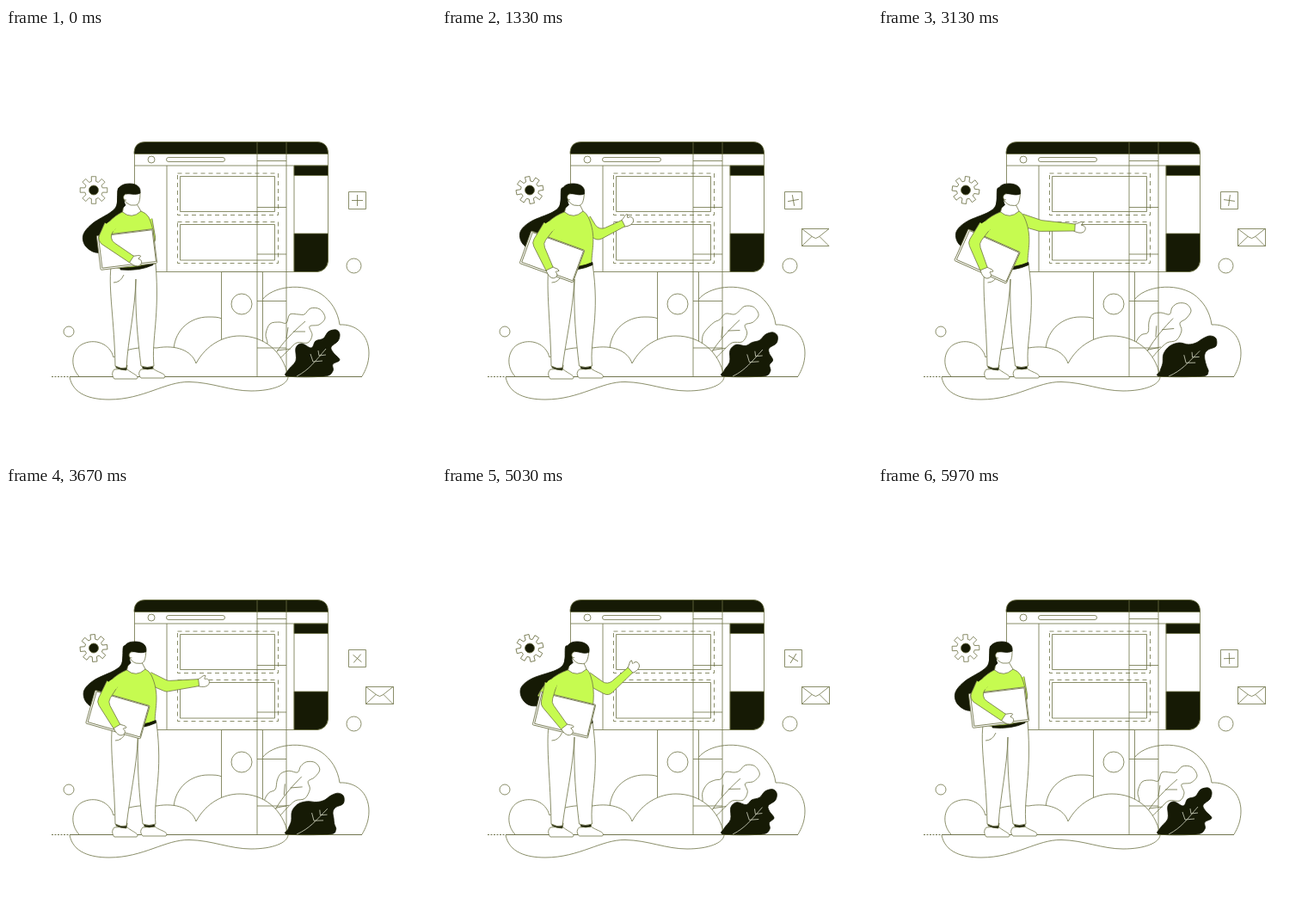
An HTML page with a canvas for the animation above (6000 ms loop, 500 px wide and 500 px high).

```html
<!DOCTYPE html>
<html>
<head>
<meta charset="utf-8">
<style>
html, body { margin: 0; width: 100%; height: 100%; overflow: hidden; background: #fff; }
canvas { display: block; }
</style>
</head>
<body>
<canvas id="stage" width="500" height="500"></canvas>
<script>
const ctx = document.getElementById('stage').getContext('2d');
const LOOP = 6000, TAU = Math.PI * 2;
const DARK = '#161a05', GREEN = '#c6fb50', LINE = '#6d7145', WHITE = '#fff';

// time, lean, hip, laptop x y angle, near elbow, near wrist, far elbow, far wrist, far hand angle
const poses = [
  [0, 0, 0, 140.5, 257.5, -7, 112, 246, 146, 269, 168, 246, 156, 262, 20],
  [1330, 7, 5, 128, 266, 20, 111, 250, 125, 280, 181, 242, 211, 227, -22],
  [2270, 2, 3, 130, 266, 11.5, 111, 253, 130, 281, 184, 234, 222, 226, -4],
  [3130, 7, 5, 127, 265.5, 24, 111, 250, 123, 280, 189, 230, 229, 232, 12],
  [4230, 3, 3, 133, 266, 7.5, 113, 252, 135, 279, 185, 236, 219, 225, -15],
  [5030, 11, 5, 142, 266, 13.5, 121, 253, 142, 280, 193, 238, 219, 214, -38]
];
poses.push([LOOP, ...poses[0].slice(1)]);

const darkLeaf = [
  [328,405, 328,398, 337,387, 337,372, 344,367, 355,372, 360,364, 369,361, 375,353,
   384,351, 388,356, 386,364, 378,371, 381,378, 388,386, 380,391, 380,399, 370,405],
  [328,405, 328,399, 331,390, 332,379, 339,370, 350,366, 361,368, 370,366, 378,361,
   386,358, 393,361, 393,370, 384,374, 380,379, 380,386, 382,393, 384,400, 376,405]
];
const lightLeaf = [
  [302,375, 304,366, 302,356, 307,344, 318,342, 326,343, 330,333, 340,333, 347,333, 354,326,
   365,327, 371,337, 364,345, 353,347, 356,357, 351,366, 338,366, 328,375, 315,385],
  [302,377, 300,366, 306,357, 314,354, 315,342, 319,333, 329,331, 339,333, 342,325, 349,320,
   359,321, 364,329, 358,338, 351,343, 353,352, 347,363, 336,366, 326,375, 315,385]
];

const mix = (a, b, k) => a.map((v, i) => v + (b[i] - v) * k);

function paint(path, fill, stroke = LINE, width = 0.8) {
  if (fill) { ctx.fillStyle = fill; ctx.fill(path); }
  if (stroke) { ctx.strokeStyle = stroke; ctx.lineWidth = width; ctx.stroke(path); }
}
const shape = (d, fill, stroke, width) => paint(new Path2D(d), fill, stroke, width);

function rect(x, y, w, h, fill, r = 0) {
  const p = new Path2D();
  p.roundRect(x, y, w, h, r);
  paint(p, fill);
}

function circle(x, y, r, fill) {
  const p = new Path2D();
  p.arc(x, y, r, 0, TAU);
  paint(p, fill);
}

function at(x, y, degrees, draw) {
  ctx.save();
  ctx.translate(x, y);
  ctx.rotate(degrees * Math.PI / 180);
  draw();
  ctx.restore();
}

// Closed smooth curve through a flat list of points
function blob(list) {
  const n = list.length / 2, p = new Path2D();
  const X = i => list[(i + n) % n * 2], Y = i => list[(i + n) % n * 2 + 1];
  p.moveTo(X(0), Y(0));
  for (let i = 0; i < n; i++) {
    p.bezierCurveTo(X(i) + (X(i + 1) - X(i - 1)) / 6, Y(i) + (Y(i + 1) - Y(i - 1)) / 6,
      X(i + 1) - (X(i + 2) - X(i)) / 6, Y(i + 1) - (Y(i + 2) - Y(i)) / 6, X(i + 1), Y(i + 1));
  }
  p.closePath();
  return p;
}

// Tapered sleeve: shoulder, elbow and wrist with half widths
function sleeve(s, e, w, ws, we, ww) {
  const a = Math.atan2(e[1] - s[1], e[0] - s[0]), b = Math.atan2(w[1] - e[1], w[0] - e[0]);
  const bend = Math.atan2(Math.sin(a) + Math.sin(b), Math.cos(a) + Math.cos(b));
  const off = (q, angle, d) => [q[0] - Math.sin(angle) * d, q[1] + Math.cos(angle) * d];
  const p = new Path2D();
  p.moveTo(...off(s, a, ws));
  p.arcTo(...off(e, bend, we), ...off(w, b, ww), 9);
  p.lineTo(...off(w, b, ww));
  p.lineTo(...off(w, b, -ww));
  p.arcTo(...off(e, bend, -we), ...off(s, a, -ws), 9);
  p.lineTo(...off(s, a, -ws));
  paint(p, GREEN);
}

function gear(angle) {
  at(102, 188.5, angle, () => {
    const p = new Path2D();
    for (let i = 0; i < 8; i++) {
      for (const [r, d] of [[10.5, -0.25], [16, -0.17], [16, 0.17], [10.5, 0.25]]) {
        const a = i * TAU / 8 + d;
        p.lineTo(r * Math.cos(a), r * Math.sin(a));
      }
    }
    p.closePath();
    paint(p, WHITE);
    circle(0, 0, 5.5, DARK);
  });
}

function icons(t) {
  const angle = t / LOOP * 360;
  gear(angle);
  rect(398.5, 190.5, 20, 20, WHITE);
  at(408.5, 200.5, angle, () => shape('M-6.5 0H6.5M0 -6.5V6.5'));
  circle(404.5, 276.5, 8.5, WHITE);
  circle(73, 353, 6, WHITE);
  if (t > 970) {
    shape('M450 233.5H418.5V253.5H450M418.5 233.5L431 243Q434.5 246 438 243L450 233.5M418.5 253.5L430 242.5M450 253.5L439 242.5');
    if (t > 1400) shape('M450.5 233V254');
  }
}

function backdrop() {
  shape('M298 316C310 300 345 296 366 309C378 317 386 330 388 345C406 344 422 356 422 378C422 390 418 398 414 405');
  shape('M195 373C197 350 215 336 235 336C242 336 247 336 251 338');
  shape('M85 405C75 395 75 376 88 368C103 360 121 367 125 383C140 371 160 371 175 372C198 368 216 375 221 390', WHITE);
  rect(250.5, 283.5, 48, 100, WHITE);
  circle(274, 321, 12, WHITE);
}

function monitor() {
  rect(149.5, 132.5, 225, 151, WHITE, [13, 13, 13, 0]);
  shape('M149 146.5V144Q150 132.5 162 132.5H362Q374 133 374.5 145V146.5Z', DARK);
  shape('M149.5 160H374M187 160V283M335 160V283');
  shape('M335 160H374.5V171.5H335ZM335 239H374.5V271Q373 282 362 283.5H335Z', DARK);
  circle(169, 153, 4);
  rect(186.5, 150.5, 68, 5, null, 2.5);
  for (const [y, h, iy, ih] of [[169, 48.5, 172.5, 41], [225.5, 48, 228.5, 41.5]]) {
    ctx.setLineDash([5, 4]);
    rect(199.5, y, 117, h);
    ctx.setLineDash([]);
    rect(202.5, iy, 110, ih);
  }
}

function plants(t) {
  const k = (1 - Math.cos(t / LOOP * TAU)) / 2;
  paint(blob(mix(...lightLeaf, k)), WHITE);
  at(306, 395, -5 * k, () => shape('M0 0C5 -17 19 -34 42 -54M20 -34L22 -47M28 -42H42M9 -20L25 -22'));
  shape('M221 390C233 368 253 358 272 358C300 358 322 376 328 405H221', WHITE, null);
  shape('M221 390C233 368 253 358 272 358C300 358 322 376 328 405');
  shape('M292 133V405M326 133V405M292 154.5H326M292 208.5H326M292 263H326M292 317.5H326M292 372H326');
  paint(blob(mix(...darkLeaf, k)), DARK, DARK);
  at(338, 405, 4 * k, () => shape('M0 0C15 -8 21 -17 34 -32M19 -17L16 -26M19 -17L30 -18M26 -24L25 -30M26 -24L34 -25', null, '#d5d8c4'));
}

function ground() {
  shape('M75 405.5H414', null, '#4d5222');
  ctx.setLineDash([2, 1.5]);
  shape('M53 405.5H75', null, '#4d5222');
  ctx.setLineDash([]);
  shape('M74 406C78 426 98 432 120 432C160 432 185 411 213 411.5C240 412 260 422 285 422C310 422 327 415 328 406');
}

function legs(h) {
  const r = h * 0.5;
  shape(`M126 397C122 401 124 406 126 408H152C156 404 146 402 140 396Z`, WHITE);
  shape(`M${157 + r} 397C${153 + r} 401 ${155 + r} 405 ${157 + r} 407H${184 + r}C${188 + r} 402 ${177 + r} 401 ${171 + r} 396Z`, WHITE);
  shape(`M127.5 392H141L140 398Q133 398 128 395ZM${158 + r} 392H${171 + r}V396Q${164 + r} 398 ${159 + r} 396Z`, DARK);
  shape(`M${122 + h * 0.4} 278C${119 + h * 0.4} 305 126 340 127 393Q134 397 140 395
    C${142 + h * 0.5} 360 ${150 + h * 0.4} 330 ${151 + h * 0.6} 292
    C${150 + h * 0.6} 330 ${153 + r} 360 ${157 + r} 393Q${164 + r} 396 ${172 + r} 393
    C${169 + r} 362 ${179 + h} 335 ${174 + h * 0.2} 274Z`, WHITE);
  shape(`M${125 + h * 0.5} 296Q${133 + h * 0.5} 296 ${137 + h * 0.5} 287`);
}

function hair(l) {
  const x = l * 1.2, y = -l * 0.5;
  paint(blob([131 + x, 186, 129 + x, 205, 122 + x * 0.8, 214, 101 + x * 0.3, 227 + y * 0.6,
    90 + x * 0.15, 240 + y, 92 + x * 0.1, 253 + y, 104, 261 + y, 118 + x * 0.4, 258 + y,
    130 + x * 0.7, 236, 138 + x, 214, 142 + x, 195]), DARK, DARK);
}

function torso(l, h) {
  const r = h * 0.8;
  shape(`M${135 + l} 214C${125 + l * 0.6} 219 ${113 + l * 0.4} 230 ${108 + l * 0.3} 244L${124 + h * 0.4} 252V278
    Q${148 + r} 284 ${170 + r} 273C${170 + r} 258 ${176 + r} 242 ${166 + l * 0.6} 220
    Q${163 + l * 0.7} 215 ${157 + l} 213Z`, GREEN);
  shape(`M${133 + h} 279Q${156 + r} 279 ${171 + r} 272.5V275.5Q${155 + r} 283 ${133 + h} 281Z`, DARK, DARK);
}

function head(l) {
  shape(`M${138 + l * 1.15} 200L${135.5 + l} 214Q${146 + l} 223 ${157 + l} 213L${151 + l * 1.15} 203Z`, WHITE);
  at(144 + l * 1.2, 206, l * 0.6, () => {
    shape('M-7 -13L12 -15C12 -6 11 0 6 0H1Q-5 -2 -7 -7Z', WHITE);
    shape('M-14 -13C-15 -22 -8 -25 0 -25C8 -25 13 -21 12 -14C6 -11 0 -14 -4 -13C-8 -12 -8 -5 -5 0L-11 6L-15 5Z', DARK, DARK);
    shape('M-4 -13C-9 -12 -8 -5 -4 -6', WHITE);
  });
}

function laptop(x, y, angle) {
  at(x, y, angle, () => {
    rect(-33, -20, 66, 40, WHITE, 1);
    rect(-31, -19, 63, 37, WHITE);
  });
}

function hand(x, y, angle) {
  at(x, y, angle, () =>
    shape('M-1 -4C3 -5 5 -9 8 -8C8 -6 6 -5 7 -4C11 -5 13 -2 12 1C11 5 5 6 -1 4Z', WHITE));
}

function person(t) {
  const i = poses.findIndex((p, n) => n < poses.length - 1 && t < poses[n + 1][0]);
  const a = poses[i], b = poses[i + 1];
  const k = (1 - Math.cos((t - a[0]) / (b[0] - a[0]) * Math.PI)) / 2;
  const [, l, h, lx, ly, la, nex, ney, nwx, nwy, fex, fey, fwx, fwy, fa] = mix(a, b, k);

  hair(l);
  legs(h);
  hand(fwx, fwy, fa);
  sleeve([163 + l * 0.5, 223], [fex, fey], [fwx, fwy], 7, 6.5, 4);
  torso(l, h);
  head(l);
  laptop(lx, ly, la);
  const grip = Math.atan2(nwy - ney, nwx - nex) * 180 / Math.PI;
  hand(nwx, nwy, grip - 8);
  sleeve([121 + l * 0.5, 230], [nex, ney], [nwx, nwy], 7, 6.5, 4.5);
  // Hide the seam where the sleeve joins the shoulder
  ctx.fillStyle = GREEN;
  ctx.beginPath();
  ctx.arc(122 + l * 0.5, 231, 6, 0, TAU);
  ctx.fill();
}

function frame(now) {
  const t = now % LOOP;
  ctx.fillStyle = WHITE;
  ctx.fillRect(0, 0, 500, 500);
  ctx.lineJoin = 'round';
  backdrop();
  monitor();
  plants(t);
  ground();
  icons(t);
  person(t);
}

let start;
function tick(now) {
  start ??= now;
  frame(now - start);
  requestAnimationFrame(tick);
}
frame(0);
requestAnimationFrame(tick);
</script>
</body>
</html>
```
